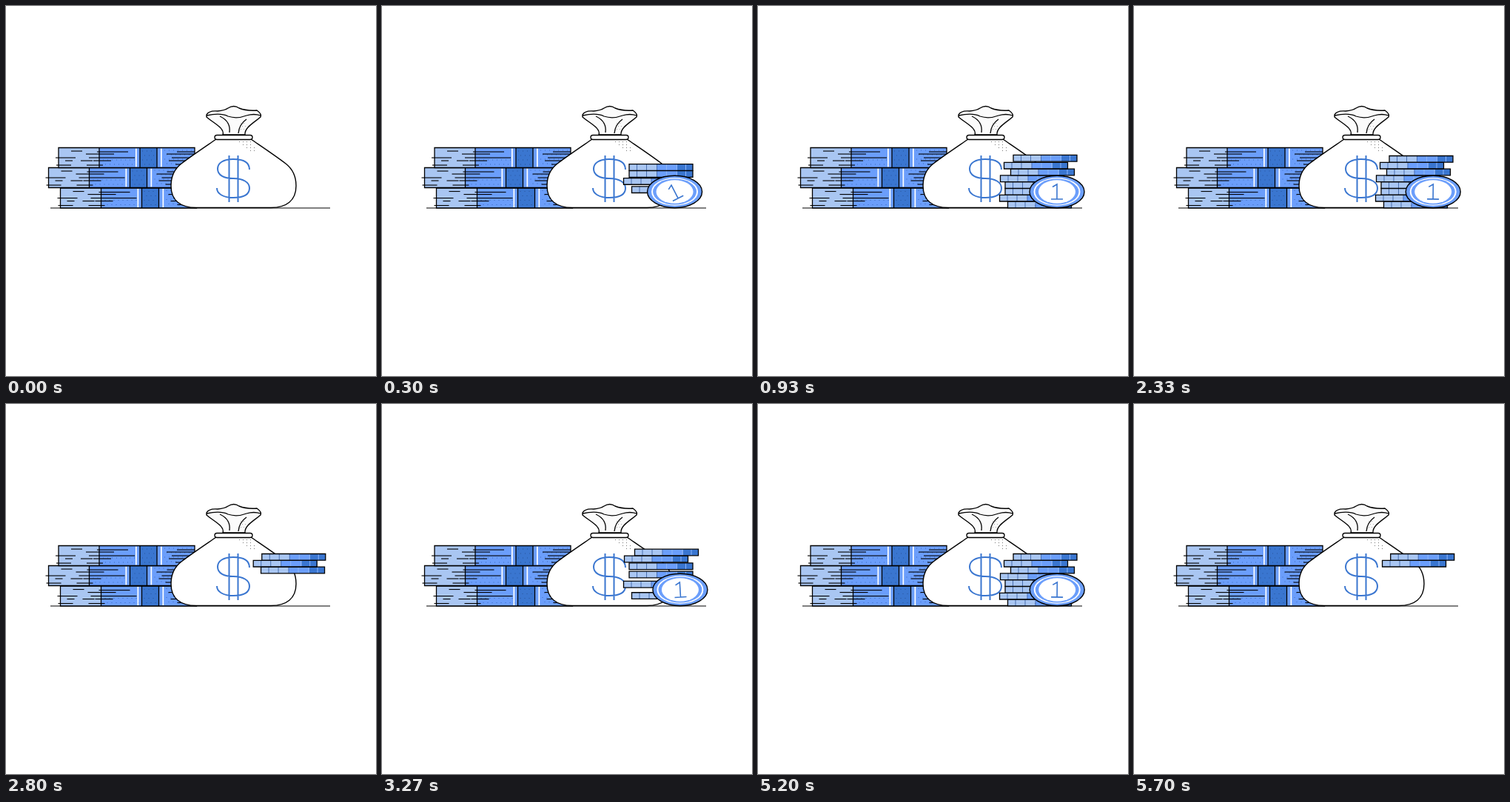
Animation of 500x500 px, one loop 5.73 s. Source, as an HTML page with a canvas:

```html
<!DOCTYPE html>
<html lang="en">
<head>
<meta charset="utf-8">
<title>Savings</title>
<style>
html, body { margin: 0; width: 100%; height: 100%; overflow: hidden; background: #fff; }
canvas { display: block; width: 500px; height: 500px; }
</style>
</head>
<body>
<canvas id="stage" width="500" height="500"></canvas>
<script>
const ctx = document.getElementById('stage').getContext('2d');
const LIGHT = '#a9c6f2', MID = '#6b9efb', DARK = '#3a76d0', INK = '#000', WHITE = '#fff';
const LOOP = 5730;

function rect(x, y, w, h, color) {
  ctx.fillStyle = color;
  ctx.fillRect(x, y, w, h);
}

function shape(d, fill, stroke, width = 1.3) {
  const path = new Path2D(d);
  if (fill) { ctx.fillStyle = fill; ctx.fill(path); }
  if (stroke) { ctx.strokeStyle = stroke; ctx.lineWidth = width; ctx.stroke(path); }
}

function oval(rx, ry, fill, stroke) {
  ctx.beginPath();
  ctx.ellipse(0, 0, rx, ry, 0, 0, 7);
  ctx.fillStyle = fill;
  ctx.fill();
  if (stroke) { ctx.strokeStyle = stroke; ctx.lineWidth = 1.4; ctx.stroke(); }
}

function dots(x, y, w, h, gap, color) {
  for (let j = 0; j * gap < h; j++)
    for (let i = 0; i * gap < w; i++)
      rect(x + i * gap + (j % 2) * gap / 2, y + j * gap, 1, 1, color);
}

// Pen strokes on a bundle: [x, y, length]
const strokes = [
  [-4, 13, 27], [17, 4, 15], [-3, 23, 20], [9, 17, 10], [30, 17, 16],
  [37, 8, 38], [41, 13, 62], [47, 17, 24], [38, 23, 22], [52, 5, 42],
  [146, 8, 38], [153, 13, 31], [160, 5, 24], [149, 17, 35], [158, 22, 26]
];

function bundle(x, y) {
  ctx.save();
  ctx.translate(x, y);
  rect(0, 0, 55, 27, LIGHT);
  rect(55, 0, 129, 27, MID);
  dots(60, 16, 44, 10, 6, '#3c6bbd');
  dots(143, 3, 38, 22, 6, '#3c6bbd');
  rect(110, 0, 23, 27, DARK);
  dots(113, 4, 18, 21, 6, '#28549a');
  rect(104, 1, 1.7, 25, WHITE);
  rect(138, 1, 1.7, 25, WHITE);
  for (const [sx, sy, len] of strokes) rect(sx, sy, len, 1.1, INK);
  shape('M0 0H184V27H0ZM55 0V27M110 0V27M133 0V27', null, INK);
  ctx.restore();
}

function bag() {
  shape('M284 180C268 191 250 203 237 213C228 220 223 230 223 243C223 263 236 272.5 257 272.5' +
    'H358C379 272.5 392 263 392 243C392 230 387 220 378 213C365 203 347 191 331 180Z', WHITE, INK, 1.4);
  for (let j = 0; j < 4; j++) dots(315 + j * 5, 183 + j * 4, 18 - j * 3, 4, 5, '#777');
  shape('M271 147Q274 141 286 142Q296 141 300 138Q308 133 315 138Q325 142 339 141Q346 146 344 150' +
    'C336 157 322 164 323 174H293C296 165 280 158 271 150Z', '#fbfbfb', INK, 1.4);
  shape('M271 148Q290 144 300 149Q312 153 325 148Q335 145 344 148M289 149Q304 156 302 171' +
    'M314 172Q315 160 325 153', null, INK);
  dots(317, 158, 8, 12, 4, '#aaa');
  ctx.beginPath();
  ctx.roundRect(282, 174.5, 51, 6, 3);
  ctx.fillStyle = WHITE;
  ctx.fill();
  ctx.stroke();
  shape('M329 221C329 211 320 207 307 207C294 207 286 212 286 220C286 229 295 233 307 233' +
    'C320 233 329 238 329 246C329 255 320 259 307 259C294 259 285 254 285 246' +
    'M301.5 202V265M313.5 202V265', null, DARK, 2);
}

function coin(x, y) {
  ctx.save();
  ctx.translate(x, y);
  rect(0, 0, 37, 8.7, LIGHT);
  rect(37, 0, 28, 8.7, MID);
  rect(65, 0, 21, 8.7, DARK);
  for (const sx of [10, 23, 37]) rect(sx, 0, 1, 8.7, '#4a6fae');
  for (const sx of [50, 64, 76]) rect(sx, 0, 1, 8.7, '#8db5fa');
  shape('M0 0H86V8.7H0Z', null, INK);
  ctx.restore();
}

function medal(shift) {
  ctx.save();
  ctx.translate(404 + shift, 251);
  oval(37, 21.7, MID, INK);
  oval(31.5, 18.8, WHITE);
  oval(29.5, 17.5, MID);
  oval(25, 15.8, WHITE);
  ctx.rotate(shift * 3.2 * Math.PI / 180);
  shape('M-6 -6.5L0 -10V10M-8 10H8', null, DARK, 1.6);
  ctx.restore();
}

// Height above rest: accelerating fall, then one small bounce
function lift(age) {
  if (age < 6) return 24 * (1 - (age / 6) ** 2.7);
  return age < 12 ? 2 * (1 - ((age - 9) / 3) ** 2) : 0;
}

// Roll in from the left past the resting place, then ease back
function rollIn(step) {
  if (step >= 23) return 0;
  if (step > 12) return 6 * (1 - (step - 12) / 11) ** 2.5;
  const u = Math.max(0, (step - 5) / 7);
  return -12 + 18 * u * u * (3 - 2 * u);
}

const coinLeft = [345, 332.5, 341.5, 327.5, 334, 334, 326.5, 337.5];

function draw(t) {
  const second = t >= 2930;
  let phase = second ? t - 2860 : t;
  if (!second && t < 670) phase = Math.min(t * 1.067, 640);
  const enter = Math.floor((phase - 70) / 39.5) + 1;
  const leave = Math.max(0, Math.floor((t - (second ? 5200 : 2330)) / 40.7) + 1);

  rect(0, 0, 500, 500, WHITE);
  rect(60, 272.5, 378, 1, INK);
  bundle(73.5, 246);
  bundle(57.5, 218.5);
  bundle(71, 191.5);
  bag();
  for (let n = 8; n > 0; n--) {
    const age = enter - 12 + n;
    const gone = Math.max(0, leave - 11 + n);
    if (age < 0 || gone >= 5) continue;
    coin(coinLeft[n - 1] + 0.19 * gone * gone, 202.5 + (n - 1) * 8.8 - lift(age));
  }
  if (enter >= 4 && leave < 7) medal(rollIn(enter) + 8 * (leave / 6) ** 2);
}

const start = performance.now();
function tick() {
  draw((performance.now() - start) % LOOP);
  requestAnimationFrame(tick);
}
tick();
</script>
</body>
</html>
```
